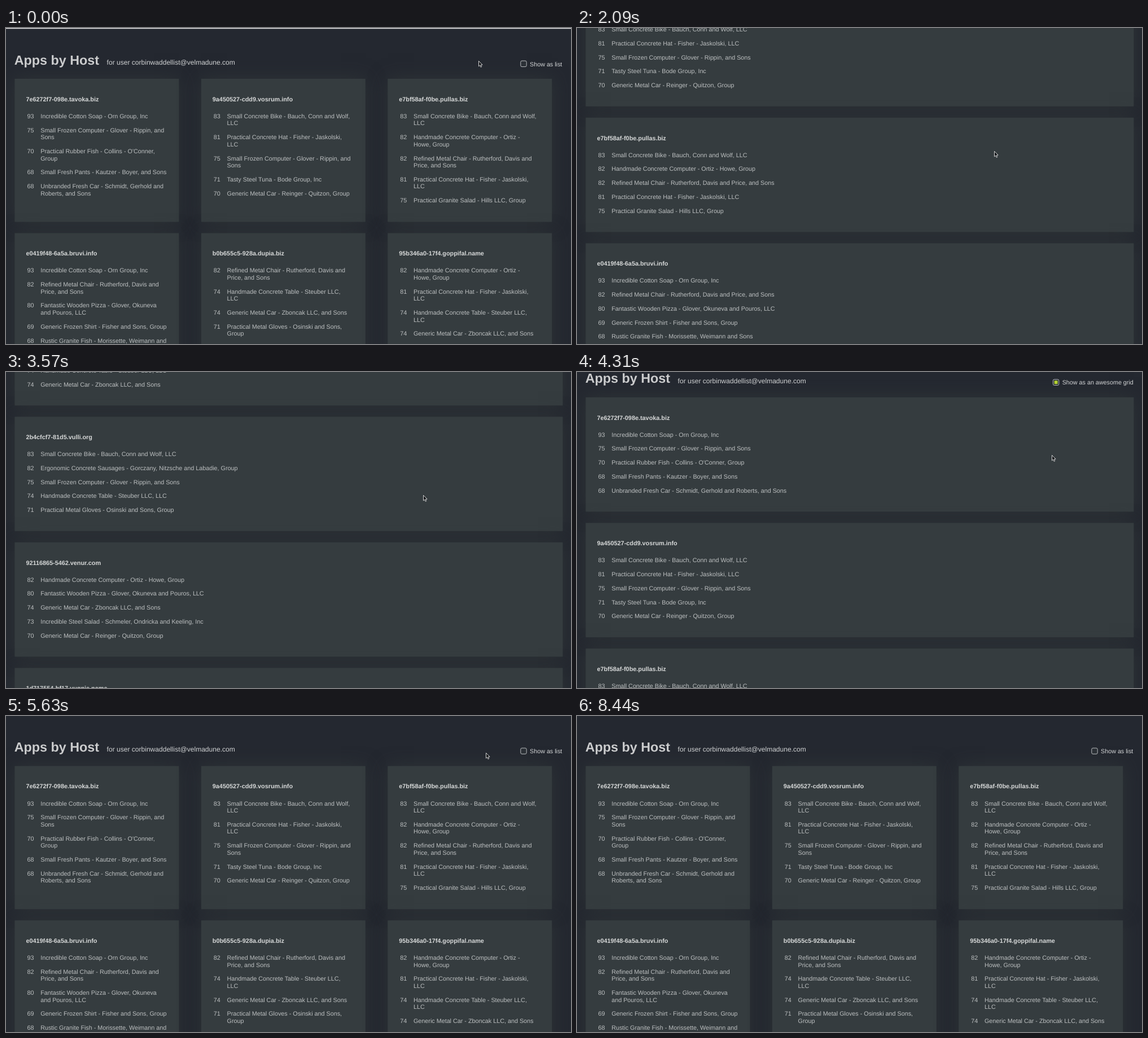
Write an HTML page with a canvas that moves like this. It is 1001 by 560 pixels and loops after 8.59 s.

```html
<!DOCTYPE html>
<html lang="en">
<head>
<meta charset="utf-8">
<title>Apps by Host</title>
<style>
  html, body { margin: 0; width: 100%; height: 100%; overflow: hidden; background: #242830; }
  canvas { display: block; }
</style>
</head>
<body>
<canvas id="stage" width="1001" height="560"></canvas>
<script>
const W = 1001, H = 560;
const LOOP = 8590, STEP = 148, LAST = 57;
const FONT = '"Liberation Sans", Arial, sans-serif';
const ctx = document.getElementById('stage').getContext('2d');

// "|" marks where the line wraps in the narrow grid cards
const apps = {
  soap: [93, 'Incredible Cotton Soap - Orn Group, Inc'],
  pc: [75, 'Small Frozen Computer - Glover - Rippin, and|Sons'],
  rubber: [70, "Practical Rubber Fish - Collins - O'Conner,|Group"],
  pants: [68, 'Small Fresh Pants - Kautzer - Boyer, and Sons'],
  fresh: [68, 'Unbranded Fresh Car - Schmidt, Gerhold and|Roberts, and Sons'],
  bike: [83, 'Small Concrete Bike - Bauch, Conn and Wolf,|LLC'],
  hat: [81, 'Practical Concrete Hat - Fisher - Jaskolski,|LLC'],
  tuna: [71, 'Tasty Steel Tuna - Bode Group, Inc'],
  car: [70, 'Generic Metal Car - Reinger - Quitzon, Group'],
  hand: [82, 'Handmade Concrete Computer - Ortiz -|Howe, Group'],
  chair: [82, 'Refined Metal Chair - Rutherford, Davis and|Price, and Sons'],
  granite: [75, 'Practical Granite Salad - Hills LLC, Group'],
  pizza: [80, 'Fantastic Wooden Pizza - Glover, Okuneva|and Pouros, LLC'],
  shirt: [69, 'Generic Frozen Shirt - Fisher and Sons, Group'],
  rustic: [68, 'Rustic Granite Fish - Morissette, Weimann and|Sons'],
  table: [74, 'Handmade Concrete Table - Steuber LLC,|LLC'],
  metal: [74, 'Generic Metal Car - Zboncak LLC, and Sons'],
  gloves: [71, 'Practical Metal Gloves - Osinski and Sons,|Group'],
  chips: [69, 'Refined Steel Chips - Gottlieb and Sons, and Sons'],
  meat: [82, 'Ergonomic Concrete Sausages - Gorczany, Nitzsche and Labadie, Group'],
  steel: [73, 'Incredible Steel Salad - Schmeler, Ondricka and Keeling, Inc']
};

const hosts = [
  ['7e6272f7-098e.tavoka.biz', 'soap pc rubber pants fresh'],
  ['9a450527-cdd9.vosrum.info', 'bike hat pc tuna car'],
  ['e7bf58af-f0be.pullas.biz', 'bike hand chair hat granite'],
  ['e0419f48-6a5a.bruvi.info', 'soap chair pizza shirt rustic'],
  ['b0b655c5-928a.dupia.biz', 'chair table metal gloves car'],
  ['95b346a0-17f4.goppifal.name', 'hand hat table metal chips'],
  ['128406fc-0d3f.fiuva.biz', 'hand pizza pc table metal'],
  ['2b4cfcf7-81d5.vulli.org', 'bike meat pc table gloves'],
  ['92116865-5462.venur.com', 'hand pizza metal steel car'],
  ['1d717554-bf17.vugnie.name', 'bike pizza pc table tuna']
].map(([name, keys]) => ({ name, rows: keys.split(' ').map(k => apps[k]) }));

// Keys are [step, value, ...]
const scrollKeys = [
  [0, -1.3], [1, 0], [11, 0], [12, 30], [13, 150], [15, 600], [18, 1265.2],
  [20, 1530], [22, 1640], [23, 1625], [24, 1567.6], [26, 1000], [28, 200],
  [29, 43.8], [30, 10], [31, 0]
];
const pointerKeys = [
  [0, 837, 58], [3, 868, 60], [6, 913, 61], [8, 913, 61], [9, 830, 140],
  [10, 739, 218], [27, 739, 218], [28, 785, 190], [29, 841, 147], [32, 851, 92],
  [35, 849, 67], [36, 850, 65], [39, 850, 65], [43, 914, 60], [49, 920, 63],
  [53, 985, 557], [54, 985, 557], [55, 985, 558], [56, 985, 558], [57, 990, 572]
];

function at(keys, k) {
  const i = keys.findIndex(p => p[0] > k);
  if (i < 0) return keys[keys.length - 1].slice(1);
  const a = keys[i - 1], b = keys[i];
  const f = (k - a[0]) / (b[0] - a[0]);
  return a.slice(1).map((v, j) => v + (b[j + 1] - v) * f);
}

const isList = k => (k >= 6 && k < 38) || (k >= 44 && k < 49);

function text(str, x, y, size, color, weight = 400) {
  ctx.font = `${weight} ${size}px ${FONT}`;
  ctx.fillStyle = color;
  ctx.fillText(str, x, y);
}

function panel(x, y, w, h) {
  ctx.save();
  ctx.shadowColor = 'rgba(54, 60, 60, 0.6)';
  ctx.shadowBlur = 30;
  ctx.fillStyle = '#353c3f';
  ctx.fillRect(x, y, w, h);
  ctx.restore();
}

function card(host, x, y, wrap) {
  text(host.name, x + 20, y + 39.6, 10.85, '#d6d8d8', 700);
  let base = y + 69.8;
  for (const [score, label] of host.rows) {
    const lines = wrap ? label.split('|') : [label.replace('|', ' ')];
    text(score, x + 22, base, 10.78, '#bdc0c1');
    lines.forEach((line, i) => text(line, x + 45.8, base + i * 12.6, 10.78, '#bdc0c1'));
    base += 24.75 + (lines.length - 1) * 12.6;
  }
}

function cards(list) {
  const boxes = hosts.slice(0, list ? 10 : 6).map((host, i) => list
    ? { host, x: 15.4, y: 88.7 + i * 222.6, w: 971, h: 202.6 }
    : { host, x: 15.4 + (i % 3) * 330.4, y: 88.7 + Math.floor(i / 3) * 273.5, w: 291, h: 253.6 });
  boxes.forEach(b => panel(b.x, b.y, b.w, b.h));
  boxes.forEach(b => card(b.host, b.x, b.y, !list));
}

function toggle(list) {
  const x = list ? 848.6 : 917;
  ctx.beginPath();
  ctx.roundRect(x - 5.2, 56.9, 10.4, 10.4, 2.2);
  ctx.fillStyle = '#2b3036';
  ctx.fill();
  ctx.strokeStyle = '#b9bcbe';
  ctx.lineWidth = 1;
  ctx.stroke();
  if (list) {
    ctx.fillStyle = '#b4d232';
    ctx.fillRect(x - 3, 59.1, 6, 6);
  }
  text(list ? 'Show as an awesome grid' : 'Show as list', list ? 859.7 : 928, 66.2, 10.76, '#d2d4d5');
}

function pointer(x, y) {
  ctx.save();
  ctx.translate(x + 0.5, y + 0.5);
  ctx.beginPath();
  ctx.moveTo(0, 0);
  ctx.lineTo(0, 9.4);
  ctx.lineTo(2.2, 7.5);
  ctx.lineTo(3.6, 10.9);
  ctx.lineTo(5.2, 10.2);
  ctx.lineTo(3.8, 6.9);
  ctx.lineTo(6.6, 6.7);
  ctx.closePath();
  ctx.fillStyle = '#15171a';
  ctx.fill();
  ctx.strokeStyle = '#e6e6e6';
  ctx.lineWidth = 0.9;
  ctx.stroke();
  ctx.restore();
}

function draw(time) {
  const k = Math.min(LAST, Math.floor((time % LOOP) / STEP));
  const [scroll] = at(scrollKeys, k);
  const list = isList(k);

  ctx.textRendering = 'geometricPrecision';
  ctx.fillStyle = '#242830';
  ctx.fillRect(0, 0, W, H);

  ctx.save();
  ctx.translate(0, -scroll);
  cards(list);
  text('Apps by Host', 14.8, 63.2, 23.3, '#cbcccd', 700);
  text('for user corbinwaddellist@velmadune.com', 178.6, 63.3, 12.05, '#cfd1d2');
  toggle(list);
  ctx.restore();

  if (scroll < 0) {
    ctx.fillStyle = '#f0f1f1';
    ctx.fillRect(0, 0, W, -scroll);
  }
  if (k < LAST) pointer(...at(pointerKeys, k));
}

const start = performance.now();
function tick() {
  draw(performance.now() - start);
  requestAnimationFrame(tick);
}
tick();
</script>
</body>
</html>
```
